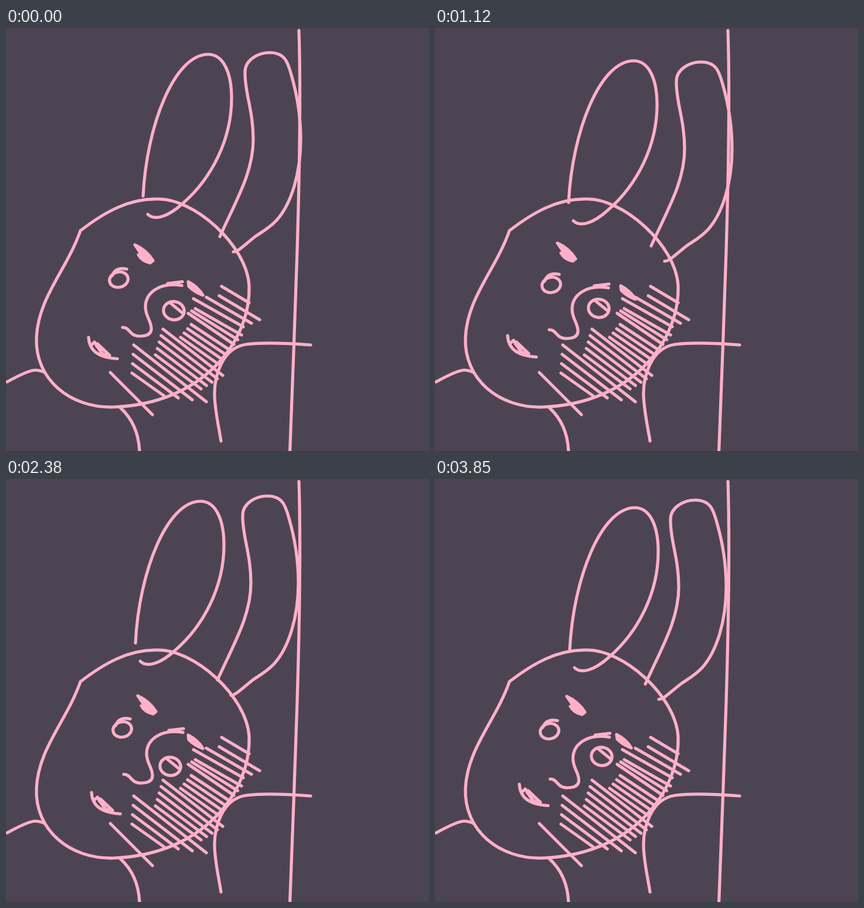
Animation of 722 by 722 pixels, one loop 3.92 s. Source, as an HTML page with a canvas:

```html
<!DOCTYPE html>
<html lang="en">
<head>
<meta charset="utf-8">
<title>Jittery rabbit</title>
<style>
html, body { margin: 0; width: 100%; height: 100%; overflow: hidden; background: #4d4453; }
canvas { display: block; }
</style>
</head>
<body>
<canvas id="stage" width="722" height="722"></canvas>
<script>
const ctx = document.getElementById('stage').getContext('2d');
const INK = '#ffb0c8', PAPER = '#4d4453';
const STEP = 70, STEPS_PER_KEY = 2, KEYS = 7;

const mix = (a, b, t) => a.map((v, i) => v + (b[i] - v) * t);

function oval(x, y, rx, ry, tilt) {
  const path = new Path2D();
  path.ellipse(x, y, rx, ry, tilt, 0, Math.PI * 2);
  return path;
}

// Evenly spaced strokes between a first and a last one, each x1,y1,x2,y2.
function hatch(count, first, last = first) {
  const path = new Path2D();
  for (let i = 0; i < count; i++) {
    const [x1, y1, x2, y2] = mix(first, last, i / Math.max(1, count - 1));
    path.moveTo(x1, y1);
    path.lineTo(x2, y2);
  }
  return path;
}

const head = `M127,346 C167,315 209,291 258,292 C320,290 411,370 415,440
  C418,534 336,642 183,647 C110,649 49,600 52,528 C55,460 104,412 127,346`;
const shoulders = `M2,604 C20,594 40,584 50,584 Q58,584 66,588 M195,648 C215,666 227,690 228,725
  M520,541 C480,538 440,536 410,540 C368,546 355,596 356,628 C357,655 363,680 367,705`;
const pole = 'M500,4 C504,130 500,280 497,380 S488,630 484.5,725';

const still = [
  ...[head, shoulders, pole].map(d => new Path2D(d)),
  hatch(1, [368, 441, 415, 469]),
  hatch(3, [364, 457, 433, 498], [320, 462, 405, 510]),
  hatch(3, [323, 479, 402, 524], [311, 487, 389, 540]),
  hatch(4, [316, 506, 381, 549], [298, 528, 363, 574]),
  hatch(5, [268, 514, 370, 593], [255, 558, 333, 616]),
  hatch(4, [218, 541, 342, 638], [215, 589, 270, 628]),
  hatch(1, [178, 588, 250, 660])
];

const part = (d, keys, { ring, solid = false } = {}) => ({ path: new Path2D(d), keys, ring, solid });

// Each part drifts on its own between key offsets.
const parts = [
  // ears
  part(`M234,287 C240,165 288,45 345,45 C372,45 385,78 385,120
    C385,190 351,257 301,300 C278,321 254,330 242,318`,
    [[0, 0], [-6, 11], [5, -13], [-13, -7], [-4, 6], [4, 19], [-8, 8]]),
  part(`M365,356 C394,292 422,246 422,190 C422,140 407,110 408,75 C408,54 431,42 450,42
    C476,42 481,58 487,80 C498,118 503,154 503,190 C503,248 487,300 462,328
    C448,343 436,348 424,357 C404,373 396,382 388,382`,
    [[0, 0], [4, 16], [-8, 15], [-4, -13], [1, -12], [6, -11], [-12, -12]]),
  // eyes
  part('M181,423 Q187,407 206,411.5',
    [[0, 0], [6, 9], [-6, 2], [6, -2], [1, -1], [-4, -1], [6, 2]],
    { ring: oval(192.5, 429.5, 16, 13, -0.25) }),
  part('M280,469 L302,487',
    [[0, 0], [-7, -4], [17, -5], [-6, 8], [-7, -9], [-9, -27], [-4, -18]],
    { ring: oval(286.5, 482.5, 17.7, 15.5, 0.15) }),
  // nose
  part(`M276,436 L301,433 M300,439.5 C262,433 238,452 238,476 C238,492 248,500 248,513
    C248,524 238,526 228,526 C210,526 212,511 199,511`,
    [[0, 0], [-4, 4], [-2, -4], [2, -7], [0, -5], [-3, -4], [-5, 2]]),
  // mouth
  part('M141,528 C142,552 160,563 190,564.5 M146,541 L151,536 L162,553 M156,539 L177,559 L166,557 L154,542',
    [[0, 0], [-17, -3], [-1, -9], [5, 7], [-10, 8], [-7, -17], [6, -14]]),
  // brows
  part('M220,370 Q240,379 251,397 L246,401 Q232,398 226,387 L231,386 Z',
    [[0, 0], [-11, -3], [-5, 4], [5, 0], [2, 0], [-1, 0], [10, 2]], { solid: true }),
  part('M311,433 Q328,442 336,456 Q322,451 312,441 Z',
    [[0, 0], [6, 7], [11, 0], [0, 4], [5, 0], [11, -5], [-2, 6]], { solid: true })
];

function offsetAt(keys, step) {
  const pos = step / STEPS_PER_KEY, i = Math.floor(pos);
  return mix(keys[i], keys[(i + 1) % KEYS], pos - i);
}

function draw(now) {
  const step = Math.floor(now / STEP) % (KEYS * STEPS_PER_KEY);
  ctx.fillStyle = PAPER;
  ctx.fillRect(0, 0, 722, 722);
  ctx.fillStyle = ctx.strokeStyle = INK;
  ctx.lineCap = ctx.lineJoin = 'round';
  ctx.lineWidth = 5.2;
  still.forEach(path => ctx.stroke(path));
  for (const { path, keys, ring, solid } of parts) {
    ctx.save();
    ctx.translate(...offsetAt(keys, step));
    ctx.stroke(path);
    if (ring) ctx.stroke(ring);
    if (solid) ctx.fill(path);
    ctx.restore();
  }
}

const start = performance.now();
function tick() {
  draw(performance.now() - start);
  requestAnimationFrame(tick);
}
tick();
</script>
</body>
</html>
```
